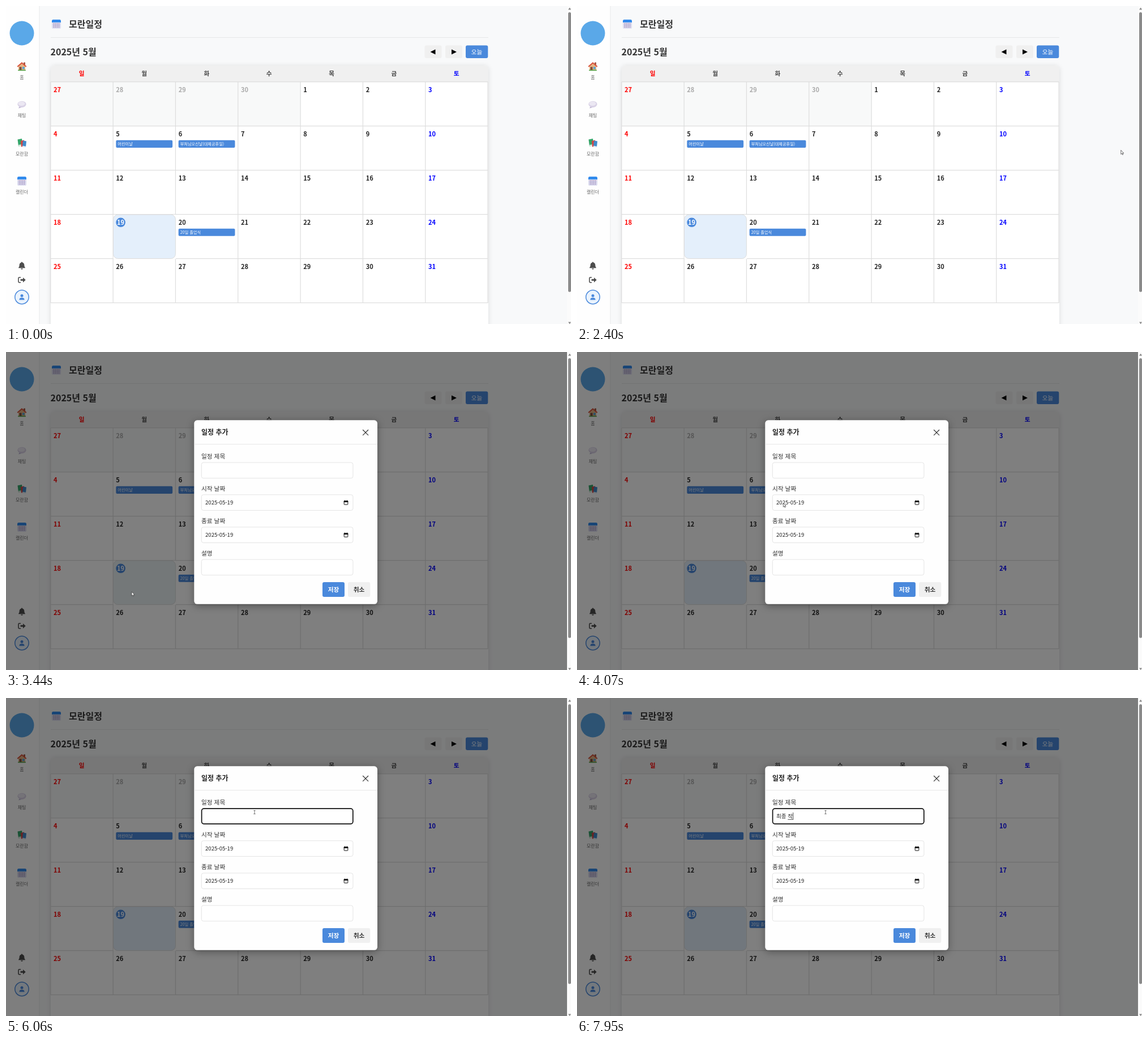
An HTML page that plays this animation: 998 px wide and 561 px high, repeating every 8 s.

```html
<!DOCTYPE html>
<html lang="ko">
<head>
<meta charset="utf-8">
<title>일정 추가</title>
<style>
html, body { margin: 0; width: 100%; height: 100%; overflow: hidden; background: #f8f9fa; }
svg { display: block; width: 100vw; height: 100vh; }
text { font-family: "Noto Sans CJK KR", "Noto Sans CJK", sans-serif; white-space: pre; }
.card { filter: drop-shadow(0 1px 4px rgba(0, 0, 0, .12)); }
.dialog { filter: drop-shadow(0 3px 7px rgba(0, 0, 0, .35)); }
</style>
</head>
<body>
<svg id="stage" viewBox="0 0 998 561"></svg>
<script>
const BLUE = '#4a89dc', LINE = '#dddddd';
const LEFT = 79, TOP = 134, COL = 110.33, ROW = 77.95;
const colX = c => LEFT + c * COL;
const rowY = r => TOP + r * ROW;

const rect = (x, y, w, h, fill, r = 0, extra = '') =>
  `<rect x="${x}" y="${y}" width="${w}" height="${h}" rx="${r}" fill="${fill}" ${extra}/>`;
const circle = (x, y, r, fill, extra = '') =>
  `<circle cx="${x}" cy="${y}" r="${r}" fill="${fill}" ${extra}/>`;
const path = (d, fill, extra = '') => `<path d="${d}" fill="${fill}" ${extra}/>`;
const stroke = (d, color, width = 1) =>
  path(d, 'none', `stroke="${color}" stroke-width="${width}" stroke-linecap="round" stroke-linejoin="round"`);
const text = (x, y, s, size, fill = '#333', weight = 400, anchor = 'start') =>
  `<text x="${x}" y="${y}" font-size="${size}" fill="${fill}" font-weight="${weight}" text-anchor="${anchor}">${s}</text>`;
const label = (x, y, s, size, fill, weight) => text(x, y, s, size, fill, weight, 'middle');
const group = (x, y, body) => `<g transform="translate(${x} ${y})">${body}</g>`;

// Icons, each centred on 0,0
function calendarIcon() {
  let dots = '';
  for (let r = 0; r < 3; r++)
    for (let c = 0; c < 4; c++) dots += circle(-4.5 + c * 3, -.6 + r * 2.8, .9, '#9a86b8');
  return rect(-8, -8, 16, 16, '#dcdcef', 2.5) +
    path('M-8-3V-5.5A2.5 2.5 0 0 1-5.5-8H5.5A2.5 2.5 0 0 1 8-5.5V-3Z', '#318bed') + dots;
}
const houseIcon = () =>
  rect(3, -7, 3, 5, '#a55a45') + path('M-6-1 0-6 6-1V7H-6Z', '#e5b584') +
  rect(-4.3, 1, 3.8, 6, '#7d4b3c') + rect(1, 1, 3.6, 3.6, '#4ba3dc') +
  stroke('M-7.2 0 0-6.3 7.2 0', '#d9533d', 2) + rect(-7, 6, 14, 1.8, '#58a34a', .8);
const bubbleIcon = () =>
  path('M-4 3-6 6.5 1 4.5Z', '#bdb3d0') +
  '<ellipse cy="-.7" rx="7.6" ry="5.6" fill="#d9d2e6"/><ellipse cx="-.6" cy="-1.8" rx="6" ry="3.8" fill="#ebe7f2"/>';
const booksIcon = () =>
  path('M-7.5-6 0-7.5 2 4-6 6Z', '#35a56a') + path('M-6 3.5 2 2V5L-5.5 6.5Z', '#d7ecdf') +
  path('M-2-3.5 4-5 5 6-1 7Z', '#d44545') + path('M2-4 8-3 7 7 1 6Z', '#3f8bcb') + path('M1 5 7 6 6.8 8 1 7Z', '#dce8f3');
const bellIcon = () =>
  path('M0-6.5C.8-6.5 1-6 1-5.4 3.6-4.8 4.4-2.7 4.4-.2 4.4 1.6 5 2.4 5.8 3.4V4.2H-5.8V3.4C-5 2.4-4.4 1.6-4.4-.2-4.4-2.7-3.6-4.8-1-5.4-1-6-.8-6.5 0-6.5ZM-1.8 5H1.8A1.8 1.8 0 0 1-1.8 5Z', '#4d4d4d');
const exitIcon = () =>
  stroke('M-2.5-4.5H-4.5Q-6-4.5-6-3V3Q-6 4.5-4.5 4.5H-2.5', '#4d4d4d', 1.6) +
  path('M-2.4-1.5H2V-4.4L6.7 0 2 4.4V1.5H-2.4Z', '#4d4d4d');
const userIcon = () =>
  circle(0, 0, 12.2, '#eaf3fd', `stroke="${BLUE}" stroke-width="1.5"`) +
  circle(0, -2.6, 2.5, BLUE) + path('M-4.6 5Q-4.6 1 0 1 4.6 1 4.6 5Z', BLUE);
const dateIcon = () =>
  rect(-3.3, -2.8, 6.6, 6.2, 'none', .6, 'stroke="#111"') +
  rect(-3.8, -3.3, 7.6, 2.4, '#111', .5) + stroke('M-2-4V-3M2-4V-3', '#111', .9);

function sidebar() {
  const items = [['홈', houseIcon], ['채팅', bubbleIcon], ['모란함', booksIcon], ['캘린더', calendarIcon]];
  return rect(0, 0, 59, 561, '#fefefe') + rect(58.5, 0, 1, 561, '#e8eaea') +
    circle(28, 48, 21.5, '#5aa8e8') +
    items.map(([name, icon], i) =>
      group(28, 106.5 + i * 67.5, icon()) + label(28, 128.8 + i * 67.5, name, 8, '#666')).join('') +
    group(28, 458, bellIcon()) + group(28, 483.3, exitIcon()) + group(28, 513.5, userIcon());
}

function header() {
  return group(89, 32, calendarIcon()) + text(111, 37.5, '모란일정', 16, '#333', 700) +
    rect(79, 55, 773, 1, '#e6e8e8') + text(78.5, 87, '2025년 5월', 16, '#333', 700) +
    rect(739.5, 69.5, 30, 22.5, '#f0f0f0', 3) + rect(776, 69.5, 30, 22.5, '#f0f0f0', 3) +
    path('M749.5 81 758.5 76.5V85.5ZM796 81 787 76.5V85.5Z', '#000') +
    rect(812, 69.5, 39.3, 22.5, BLUE, 3) + label(831.6, 85, '오늘', 10.67, '#fff');
}

function eventBar(c, r, name) {
  return rect(colX(c) + 5, rowY(r) + 24.8, 99.8, 13.2, BLUE, 2) +
    text(colX(c) + 8, rowY(r) + 34.2, name, 7.2, '#fff');
}

function calendar() {
  const dayColor = (c, normal) => c === 0 ? '#f00' : c === 6 ? '#00f' : normal;
  let out = `<g class="card">${rect(LEFT, 105, 773, 480, '#fff', 8)}</g>` +
    path('M79 134V113Q79 105 87 105H844Q852 105 852 113V134Z', '#f0f0f0') +
    rect(LEFT, TOP, COL * 4, ROW, '#f8f9f9');
  [...'일월화수목금토'].forEach((d, c) => {
    out += label(colX(c) + COL / 2 - .4, 123.4, d, 10.67, dayColor(c, '#444'), 700);
  });
  for (let c = 0; c <= 7; c++) out += rect(colX(c) - .8, TOP, 1.2, ROW * 5, LINE);
  for (let r = 0; r <= 5; r++) out += rect(LEFT, rowY(r) - .8, COL * 7, 1.2, LINE);
  out += rect(colX(1) + .4, rowY(3) + .4, COL, ROW, '#fff') +
    rect(colX(1) + .2, rowY(3) + .2, COL - .5, ROW - .5, '#e4effb', 8, `id="today" stroke="${LINE}"`) +
    circle(202.6, 381.8, 8.3, BLUE);
  for (let i = 0; i < 35; i++) {
    const c = i % 7, r = Math.floor(i / 7), day = i < 4 ? 27 + i : i - 3;
    out += day === 19 && r === 3
      ? label(202.6, 385.8, day, 11, '#fff', 700)
      : text(colX(c) + 5, rowY(r) + 18, day, 11, dayColor(c, i < 4 ? '#aaa' : '#222'), 700);
  }
  return out + eventBar(1, 1, '어린이날') + eventBar(2, 1, '부처님오신날(대체공휴일)') + eventBar(2, 3, '20일 졸업식');
}

function dialog() {
  const fields = [['일정 제목', 195], ['시작 날짜', 251.8, 1], ['종료 날짜', 308.9, 1], ['설명', 366]];
  return '<g id="dialog">' + rect(0, 0, 991, 561, '#000', 0, 'opacity=".5"') +
    `<g class="dialog">${rect(332.3, 120.3, 323.7, 324.5, '#fefefe', 5.5)}</g>` +
    text(345, 146, '일정 추가', 12, '#222', 700) +
    stroke('M630.5 137.5 639.7 146.7M639.7 137.5 630.5 146.7', '#333', 1.2) +
    rect(332.3, 162.3, 323.7, 1, '#e5e5e5') +
    fields.map(([name, y, isDate]) =>
      text(345, y - 6.8, name, 10.67, '#333', 500) +
      rect(345.3, y, 267.6, 27.6, '#fff', 3.5, `stroke="${LINE}" stroke-width=".8"`) +
      (isDate ? text(352, y + 17.5, '2025-05-19', 9.6, '#222') + group(600.5, y + 14, dateIcon()) : '')).join('') +
    rect(345.6, 195.2, 267.2, 26.9, '#fff', 4, 'id="focus" stroke="#111" stroke-width="1.7"') +
    `<text id="typed" x="352" y="212.4" font-size="9.6" fill="#222"></text>` +
    rect(352, 213.8, 0, .8, '#222', 0, 'id="underline"') + rect(352, 202, .8, 13, '#222', 0, 'id="caret"') +
    rect(559, 406, 39, 26, BLUE, 3) + label(578.5, 423.2, '저장', 10.67, '#fff', 700) +
    rect(604, 406, 39.3, 26, '#f0f0f0', 3) + label(623.6, 423.2, '취소', 10.67, '#333', 700) + '</g>';
}

const scrollbar = () => rect(991, 0, 7, 561, '#fbfbfb') + rect(993, 11, 5, 493.5, '#8b8b8b', 2.5) +
  path('M993 6.5 995.7 2.8 998 6.5ZM993 557.5H998L995.7 561Z', '#858585');

const pointer = () => '<g id="pointer">' + circle(0, 0, 6.2, '#f5ec3c', 'id="click" opacity=".85"') +
  path('M0 0V7.2L1.7 5.7 2.8 8.2 3.9 7.7 2.8 5.3H5Z', '#fff', 'id="arrow" stroke="#333" stroke-width=".7"') +
  path('M-.7 0Q0-1 .7 0V3.3L3.4 4Q4.4 4.4 4.2 5.6L3.5 9H-.5L-2.5 5.6Q-2.4 4.6-.7 5.8Z', '#fff', 'id="hand" stroke="#333" stroke-width=".7"') +
  `<g id="beam">${stroke('M-1.3-3H1.3M0-3V3M-1.3 3H1.3', '#555', .8)}</g></g>`;

document.getElementById('stage').innerHTML =
  rect(0, 0, 998, 561, '#f8f9fa') + sidebar() + header() + calendar() + dialog() + scrollbar() + pointer();

const el = id => document.getElementById(id);
const show = (id, on) => el(id).setAttribute('visibility', on ? 'inherit' : 'hidden');

// Pointer route: time, x, y
const route = [
  [2400, 960.8, 254.3], [2540, 850, 224], [2750, 540, 290], [2960, 260, 405], [3030, 200, 428], [3130, 222, 423],
  [3580, 222, 423], [3790, 270, 362], [4070, 390, 240], [4210, 444, 198], [4340, 439, 201.5], [8000, 439, 201.5]
];
// Typing: time, committed text, syllable being composed
const typing = [
  [0, '', ''], [6270, '', 'ㅊ'], [6870, '', '초'], [6940, '', '최'], [7070, '', '쵲'], [7200, '최', '조'],
  [7280, '최', '종'], [7480, '최종 ', ''], [7810, '최종 ', 'ㅈ'], [7880, '최종 ', '자'], [7950, '최종 ', '작']
];

function pointerAt(time) {
  const i = Math.max(1, route.findIndex(p => p[0] > time));
  const [t0, x0, y0] = route[i - 1], [t1, x1, y1] = route[i];
  const k = Math.max(0, (time - t0) / (t1 - t0));
  return [x0 + (x1 - x0) * k, y0 + (y1 - y0) * k];
}

function drawPointer(t) {
  const [x, y] = pointerAt(2400 + Math.floor((t - 2400) / 70) * 70);
  const overInput = t >= 3440 && x > 345 && y < 223;
  const overCell = t < 3440 && x < 851;
  show('pointer', t >= 2400);
  el('pointer').setAttribute('transform', `translate(${x} ${y})`);
  show('beam', overInput);
  show('hand', overCell);
  show('arrow', !overInput && !overCell);
  show('click', (t >= 3310 && t < 3440) || (t >= 4470 && t < 4540));
}

function drawInput(t) {
  const [, done, composing] = typing.findLast(step => step[0] <= t);
  const typed = el('typed');
  typed.textContent = done + composing;
  const end = typed.getComputedTextLength();
  const start = composing ? end - .92 * 9.6 : end;
  el('underline').setAttribute('x', 352 + start);
  el('underline').setAttribute('width', end - start);
  el('caret').setAttribute('x', 352.2 + end);
  const hidden = (t >= 5000 && t < 5530) || (t >= 6060 && t < 6270) || (t >= 6800 && t < 6870);
  show('focus', t >= 4470);
  show('caret', t >= 4470 && !hidden);
}

function frame(now) {
  const t = now % 8000;
  show('dialog', t >= 3440);
  el('today').setAttribute('fill', t < 3060 || t >= 3510 ? '#e4effb' : t < 3440 ? '#f5f5f5' : '#e9f1f3');
  if (t >= 3440) drawInput(t);
  else ['focus', 'caret'].forEach(id => show(id, false));
  drawPointer(t);
  requestAnimationFrame(frame);
}
requestAnimationFrame(frame);
</script>
</body>
</html>
```
